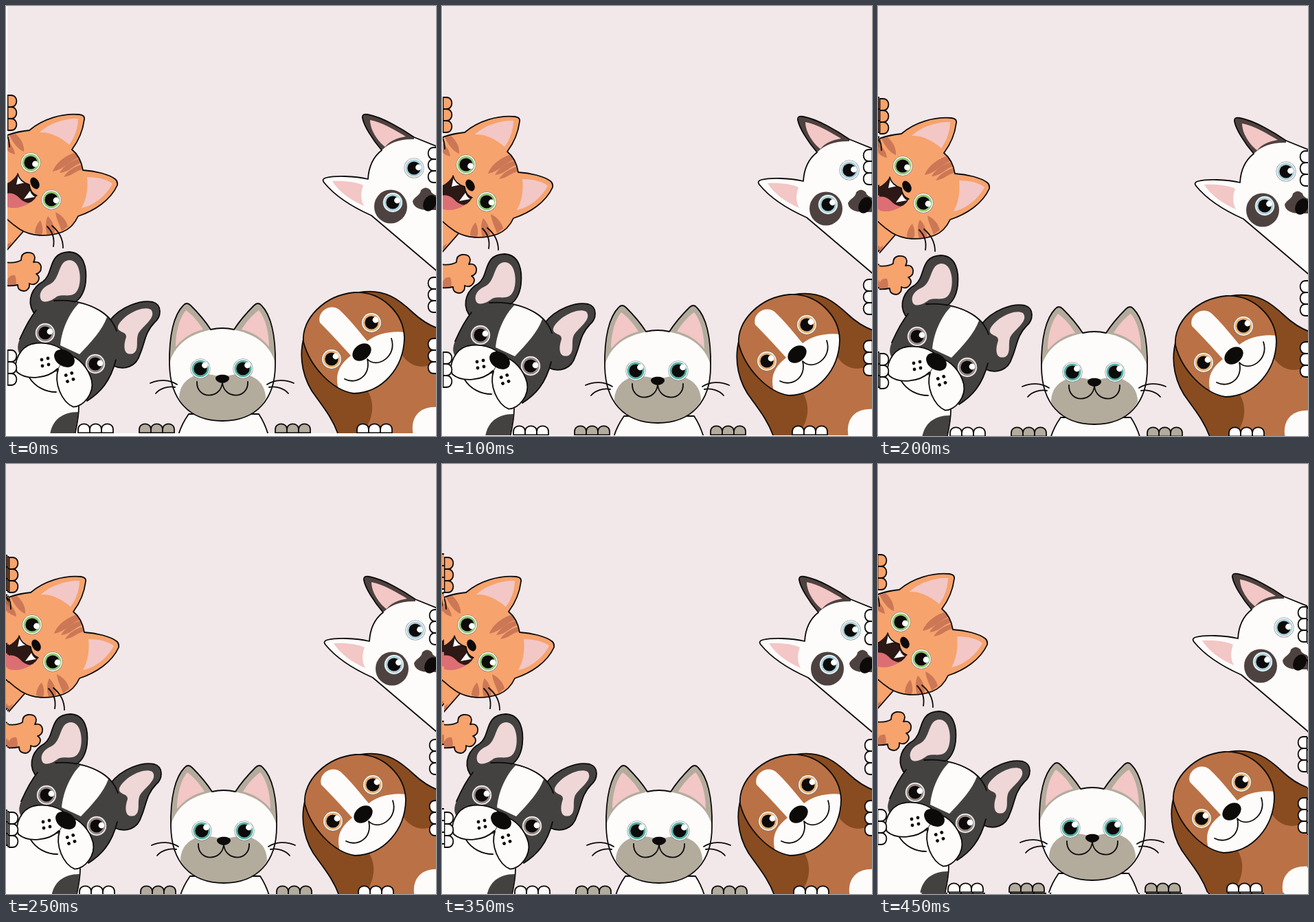
An HTML page with a canvas for the animation above (0.5 s loop, 626 by 626 pixels).

```html
<!DOCTYPE html>
<html lang="en">
<head>
<meta charset="utf-8">
<title>Peeking pets</title>
<style>
html, body { margin: 0; width: 100%; height: 100%; overflow: hidden; background: #fff; }
canvas { display: block; width: 626px; height: 626px; }
</style>
</head>
<body>
<canvas id="stage" width="626" height="626"></canvas>
<script>
const INK = '#0d0a0a', WHITE = '#fdfcfb', PINK = '#f2c7c6';
const W = 626, H = 625;

const art = document.createElement('canvas');
art.width = W;
art.height = H;
const g = art.getContext('2d');
g.lineCap = g.lineJoin = 'round';

function fill(d, color) {
  g.fillStyle = color;
  g.fill(new Path2D(d));
}
function line(d, width = 1.8) {
  g.strokeStyle = INK;
  g.lineWidth = width;
  g.stroke(new Path2D(d));
}
function shape(d, color) {
  fill(d, color);
  line(d);
}
function oval(x, y, rx, ry = rx, deg = 0, color = INK) {
  g.fillStyle = color;
  g.beginPath();
  g.ellipse(x, y, rx, ry, deg * Math.PI / 180, 0, 7);
  g.fill();
}
function eye(x, y, iris, dx, dy) {
  oval(x, y, 14.5, 14.5, 0, '#777');
  oval(x, y, 13.9, 13.9, 0, WHITE);
  oval(x, y, 12.5, 12.5, 0, iris);
  oval(x, y, 9.6);
  oval(x + dx, y + dy, 4.4, 4.4, 0, '#fff');
}
function toes(x, y, deg, color) {
  g.save();
  g.translate(x, y);
  g.rotate(deg * Math.PI / 180);
  for (let i = 0; i < 3; i++) {
    shape('M0 0V-5C0 -15.5 17 -15.5 17 -5V0Z', color);
    g.translate(17, 0);
  }
  g.restore();
}
// Draws once as is and once reflected in an axis through x, y.
function mirrored(x, y, deg, draw) {
  const turn = deg * Math.PI / 180;
  draw();
  g.save();
  g.translate(x, y);
  g.rotate(turn);
  g.scale(-1, 1);
  g.rotate(-turn);
  g.translate(-x, -y);
  draw();
  g.restore();
}

function gingerCat() {
  const fur = '#f7a36d', stripe = '#cc7756';
  shape('M-3 361L26 328L-3 300Z', fur);
  fill('M0 350L6 346L4 351L0 356Z', stripe);
  const head = 'M-3 192C8 188 20 185 32 184C52 167 80 159 105 161Q113 162 112 168C110 184 103 200 94 212' +
    'C103 219 108 230 110 242C128 243 148 248 157 255Q161 258 160 264C150 286 127 301 103 309' +
    'C98 320 90 328 80 332C58 340 34 338 18 328Q6 320 -3 311Z';
  fill(head, fur);
  fill('M47 187C60 174 85 166 103 167C103 181 97 196 90 205C78 194 62 186 47 187Z', PINK);
  fill('M116 252C132 252 147 256 153 262C143 280 125 294 108 297C115 285 118 268 116 252Z', PINK);
  fill('M66 244C70 232 84 221 97 217Q102 219 103 224C91 228 82 241 66 244Z', stripe);
  fill('M76 246C82 235 94 228 104 225L106 232C96 235 90 245 76 246Z', stripe);
  fill('M82 252C88 242 98 237 107 234L109 241C99 243 95 250 82 252Z', stripe);
  fill('M3 191L12 189C20 196 25 206 24 215C14 211 8 201 3 191Z', stripe);
  fill('M-1 199C6 204 10 211 11 219Q3 217 -1 212Z', stripe);
  fill('M48 315C52 324 52 331 50 336L40 334C40 327 43 320 48 315Z', stripe);
  fill('M59 309C66 316 69 325 69 334L58 336C55 327 55 317 59 309Z', stripe);
  fill('M70 303C79 307 86 315 88 324L79 331C76 321 71 313 70 303Z', stripe);
  line(head);
  line('M58 324C66 332 69 341 67 353');
  line('M65 323C76 332 81 342 81 355');
  line('M-1 190Q3 198 3 208');
  eye(34, 231, '#93c873', 6.5, 2);
  eye(64, 285, '#93c873', 7, 1);
  fill('M15 247Q18 259 32 263Q33 275 43 279Q37 291 24 291Q8 298 -2 293V262Q8 258 15 247Z', '#2c1815');
  fill('M-2 276Q8 274 16 281Q23 289 32 290Q14 301 -2 295Z', '#dc6f74');
  fill('M16 249Q19 256 26 260L13 263Z', WHITE);
  fill('M33 272Q35 278 40 281L24 284Z', WHITE);
  line('M15 247Q18 259 32 263Q33 275 43 279', 1.5);
  oval(40, 261, 6, 9, -28);
  const arm = 'M-3 376Q12 378 20 373Q20 363 28 362Q39 361 40 369Q40 373 38 376Q47 374 49 382Q50 391 42 393' +
    'Q48 397 45 403Q40 411 32 407Q33 416 25 418Q15 418 15 409Q6 411 -3 410Z';
  fill(arm, fur);
  fill('M-1 403Q4 393 11 395Q14 402 12 410H-1Z', stripe);
  line(arm);
  toes(0.5, 133, 90, fur);
}

function bulldog() {
  const coat = '#434241', inner = '#efd7d8', ring = '#978a86';
  fill('M-3 530L14 530L104 586C104 602 101 614 98 628H-3Z', WHITE);
  fill('M62 628C64 608 78 594 103 594C102 606 100 616 97 628Z', coat);
  line('M104 586C104 602 101 614 98 628');
  shape('M38 449C27 431 37 412 52 404C68 392 58 362 90 361C112 362 116 385 114 405C112 421 105 431 96 436L60 450Z', coat);
  fill('M48 428C46 420 52 412 62 408C78 400 73 373 91 373C106 374 108 400 104 412C98 431 84 421 72 426C62 434 50 437 48 428Z', inner);
  shape('M148 462C165 440 195 430 212 434C226 438 224 456 214 464C200 478 200 495 193 510C188 528 170 534 155 527Z', coat);
  fill('M161 469C168 453 197 438 209 445C218 456 198 468 191 479C186 490 193 503 183 509C168 513 169 496 173 485C174 476 159 479 161 469Z', inner);
  const head = 'M42 446C58 431 104 428 134 446C162 462 168 490 158 518C150 550 135 566 116 578L20 512C14 505 14 498 18 488C26 470 32 458 42 446Z';
  fill(head, coat);
  fill('M104 436C120 438 135 446 145 456C138 475 122 492 105 510L77 497C79 474 90 450 104 436Z', WHITE);
  line('M18 488C26 470 32 458 42 446');
  line('M68 432C92 430 115 435 134 446C146 453 155 464 159 476');
  line('M158 518C150 550 135 566 116 578');
  eye(55, 479, ring, 7, -2);
  eye(128, 524, ring, 7, -1);
  fill('M14 538L32 545C40 558 55 566 72 566L78 535Z', WHITE);
  line('M32 544C40 557 55 565 71 565');
  mirrored(83, 516, 31.7, () => {
    const jowl = 'M86 510C76 496 54 491 36 495C18 500 8 522 14 536C28 548 58 546 73 531';
    fill(jowl + 'L83 516Z', WHITE);
    line(jowl);
    for (const [x, y] of [[50, 518], [59, 516], [51, 527], [60, 525]]) oval(x, y, 2.4);
  });
  oval(83, 516, 16, 11.5, 32);
  toes(0.5, 504, 90, WHITE);
}

function greyCat() {
  const grey = '#b3ac9d';
  shape('M264 597C257 607 252 616 249 628H380C376 614 372 606 366 597Z', WHITE);
  const head = 'M236 525C235 481 243 452 256 439Q261 433 267 439C279 451 289 463 296 474Q313 470 330 474' +
    'C337 463 347 451 359 439Q365 433 370 439C383 452 391 481 390 525C390 575 363 607 313 607C263 607 237 575 236 525Z';
  fill(head, grey);
  g.save();
  g.clip(new Path2D(head));
  mirrored(313, 0, 0, () => {
    fill('M245 499C245 477 251 456 260 446C270 453 279 464 285 474Q262 479 245 499Z', PINK);
    fill('M234 532C239 500 262 476 314 472V610H234Z', WHITE);
  });
  fill('M250 574C250 556 262 540 286 539C300 539 305 542 313 543C321 542 326 539 340 539C364 540 376 556 376 574C364 598 340 607 313 607C286 607 262 598 250 574Z', grey);
  g.restore();
  line(head);
  eye(281, 531, '#52b3a6', 6.5, -5);
  eye(343, 531, '#52b3a6', 6.5, -5);
  fill('M303 545C303 538 323 538 323 545C323 549 317 552 313 552C309 552 303 549 303 545Z', INK);
  line('M276 550C275 576 311 576 313 551C315 576 351 576 350 550');
  mirrored(312.5, 0, 0, () => line('M247 554C236 547 221 546 208 552M244 558C233 556 222 560 216 567'));
}

function spaniel() {
  const coat = '#ba7145', dark = '#884c20', gold = '#e8b273';
  fill('M512 420C550 413 572 432 590 449Q608 466 629 473V628H482C474 606 464 592 452 575L500 500Z', coat);
  fill('M512 420C550 413 572 432 590 449Q608 466 629 473V518C604 538 577 525 570 500Z', dark);
  fill('M432 484C423 516 431 549 450 573C464 592 475 607 482 628H514C534 606 536 580 523 561Z', dark);
  fill('M591 628C585 600 602 584 629 587V628Z', WHITE);
  line('M512 420C550 413 572 432 590 449Q608 466 629 473');
  line('M432 484C423 516 431 549 450 573C464 592 475 607 482 628');
  const head = 'M431 492C428 458 462 424 505 420C545 418 577 450 578 486C577 530 546 566 504 567C472 562 440 527 431 492Z';
  fill(head, coat);
  g.save();
  g.clip(new Path2D(head));
  fill('M485 570C475 543 480 528 500 512C485 495 466 475 455 464C450 448 470 435 483 445C497 458 510 474 524 491C537 480 560 475 580 478V570Z', WHITE);
  g.restore();
  line(head);
  eye(472, 517, gold, 6, -4);
  eye(530, 464, gold, 6, -4);
  line('M491 546C508 555 530 541 524 517C538 532 568 513 559 487');
  oval(516, 507, 15, 11, -38);
}

function whiteCat() {
  const dark = '#4d423f', ring = '#a9d2dd';
  const head = 'M629 209L592 194C575 182 546 165 525 161Q516 159 517 166C519 177 531 197 545 213C532 223 526 238 525 255' +
    'C505 250 476 250 464 253Q457 255 461 260C478 281 503 296 530 308L629 392Z';
  fill(head, WHITE);
  fill('M592 194C575 182 546 165 525 161Q516 159 517 166C519 177 531 197 545 213Q562 196 592 197Z', dark);
  fill('M528 169C545 172 565 184 580 193C567 195 556 200 550 208C539 200 528 183 528 169Z', PINK);
  fill('M473 258C490 257 508 259 518 264C514 275 514 284 519 294C500 286 482 273 473 258Z', PINK);
  line(head);
  oval(558, 295, 24, 24.5, 0, dark);
  eye(592, 239, ring, 6.5, -1);
  eye(561, 289, ring, 6.5, -3);
  fill('M590 287C593 280 601 279 602 271Q609 264 616 271Q617 277 628 280V300H612C602 300 591 297 590 287Z', dark);
  oval(615, 290, 9, 12.5, 28);
  line('M621 281L628 290');
}

g.fillStyle = '#f2e8ea';
g.fillRect(0, 0, W, H);
gingerCat();
bulldog();
greyCat();
spaniel();
whiteCat();
for (const bottom of [260, 449, 538]) toes(625.5, bottom, -90, WHITE);
toes(103, 624.3, 0, WHITE);
toes(192, 624.3, 0, '#b3ac9d');
toes(390, 624.3, 0, '#b3ac9d');
toes(509, 624.3, 0, WHITE);

// Shake: one offset per step; uncovered edges keep what earlier steps left there.
const STEP = 50;
const shake = [[2, -3], [2, 0], [1, 0], [0, 0], [2, 2], [4, 3], [-3, -2], [3, 3], [1, 1], [-1, -1]];
const ctx = document.getElementById('stage').getContext('2d');
let shown = -1;

function show(step) {
  ctx.fillStyle = '#fff';
  ctx.fillRect(0, 0, 626, 626);
  for (const [x, y] of shake.slice(0, step + 1)) ctx.drawImage(art, x, y);
  shown = step;
}
function tick() {
  const step = Math.floor(performance.now() / STEP) % shake.length;
  if (step !== shown) show(step);
  requestAnimationFrame(tick);
}
tick();
</script>
</body>
</html>
```
